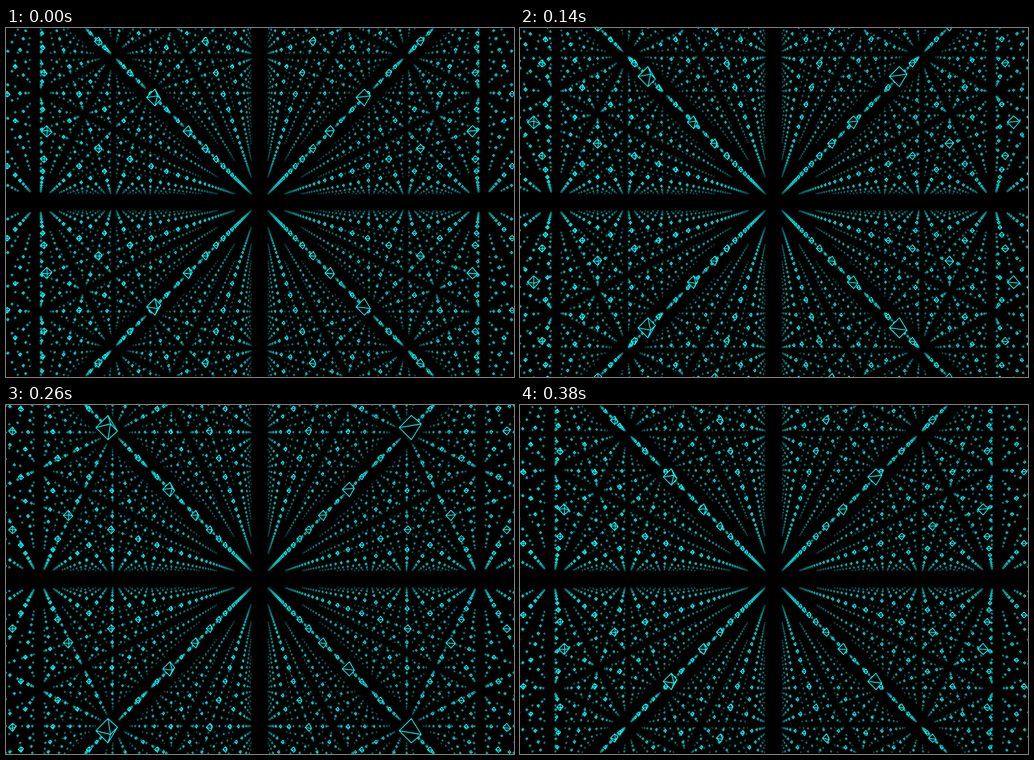
An HTML page with a canvas for the animation above (0.4 s loop, 800 px wide and 550 px high).

```html
<!DOCTYPE html>
<html lang="en">
<head>
<meta charset="utf-8">
<title>Crystal lattice</title>
<style>
  html, body { margin: 0; width: 100%; height: 100%; overflow: hidden; background: #000; }
  canvas { display: block; }
</style>
</head>
<body>
<canvas id="stage" width="800" height="550"></canvas>
<script>
const ctx = document.getElementById('stage').getContext('2d');

const WIDTH = 800, HEIGHT = 550;
const CENTER_X = 399.5, CENTER_Y = 274.5;
const FOCAL = 400 / Math.tan(Math.PI / 6);
const RADIUS = 0.04;
const LAYERS = 26, HALF_SPAN = 11;
const STEP_MS = 20, STEPS = 20;
const START_DEPTH = 0.1;

// Each crystal is a three-sided double pyramid; this is its waist.
const waist = [0, 1, 2].map(k => {
  const angle = k * Math.PI * 2 / 3;
  return { x: -RADIUS * Math.cos(angle), z: -RADIUS * Math.sin(angle) };
});

function project(x, y, z) {
  return [CENTER_X + FOCAL * x / z, CENTER_Y + FOCAL * y / z];
}

function isFront(a, b, c, side) {
  const area = (b[0] - a[0]) * (c[1] - a[1]) - (b[1] - a[1]) * (c[0] - a[0]);
  return area * side > 0;
}

function addTriangle(a, b, c) {
  ctx.moveTo(a[0], a[1]);
  ctx.lineTo(b[0], b[1]);
  ctx.lineTo(c[0], c[1]);
  ctx.closePath();
}

function addCrystal(x, y, z) {
  const ring = waist.map(v => project(x + v.x, y, z + v.z));
  for (const side of [-1, 1]) {
    const tip = project(x, y + side * RADIUS, z);
    ring.forEach((a, k) => {
      const b = ring[(k + 1) % ring.length];
      if (isFront(tip, a, b, side)) addTriangle(tip, a, b);
    });
  }
}

function cellsAcross(size, z) {
  return Math.min(HALF_SPAN, Math.ceil(size / 2 * z / FOCAL + 0.5));
}

function drawLayer(z) {
  const columns = cellsAcross(WIDTH, z);
  const rows = cellsAcross(HEIGHT, z);
  const light = Math.round(255 * Math.min(1, 1.3 - z / 24));

  ctx.beginPath();
  for (let i = -columns; i < columns; i++) {
    for (let j = -rows; j < rows; j++) addCrystal(i + 0.5, j + 0.5, z);
  }
  ctx.fill();
  ctx.strokeStyle = `rgb(0, ${light}, ${light})`;
  ctx.stroke();
}

function draw(step) {
  ctx.fillStyle = '#000';
  ctx.fillRect(0, 0, WIDTH, HEIGHT);
  ctx.lineWidth = 1.3;
  ctx.lineJoin = 'round';
  // Far to near, so that nearer solids hide what lies behind them.
  for (let n = LAYERS; n >= 2; n--) drawLayer(n + START_DEPTH - step / STEPS);
}

let shownStep = -1;

function tick() {
  const step = Math.floor(performance.now() / STEP_MS) % STEPS;
  if (step !== shownStep) {
    draw(step);
    shownStep = step;
  }
  requestAnimationFrame(tick);
}

tick();
</script>
</body>
</html>
```
